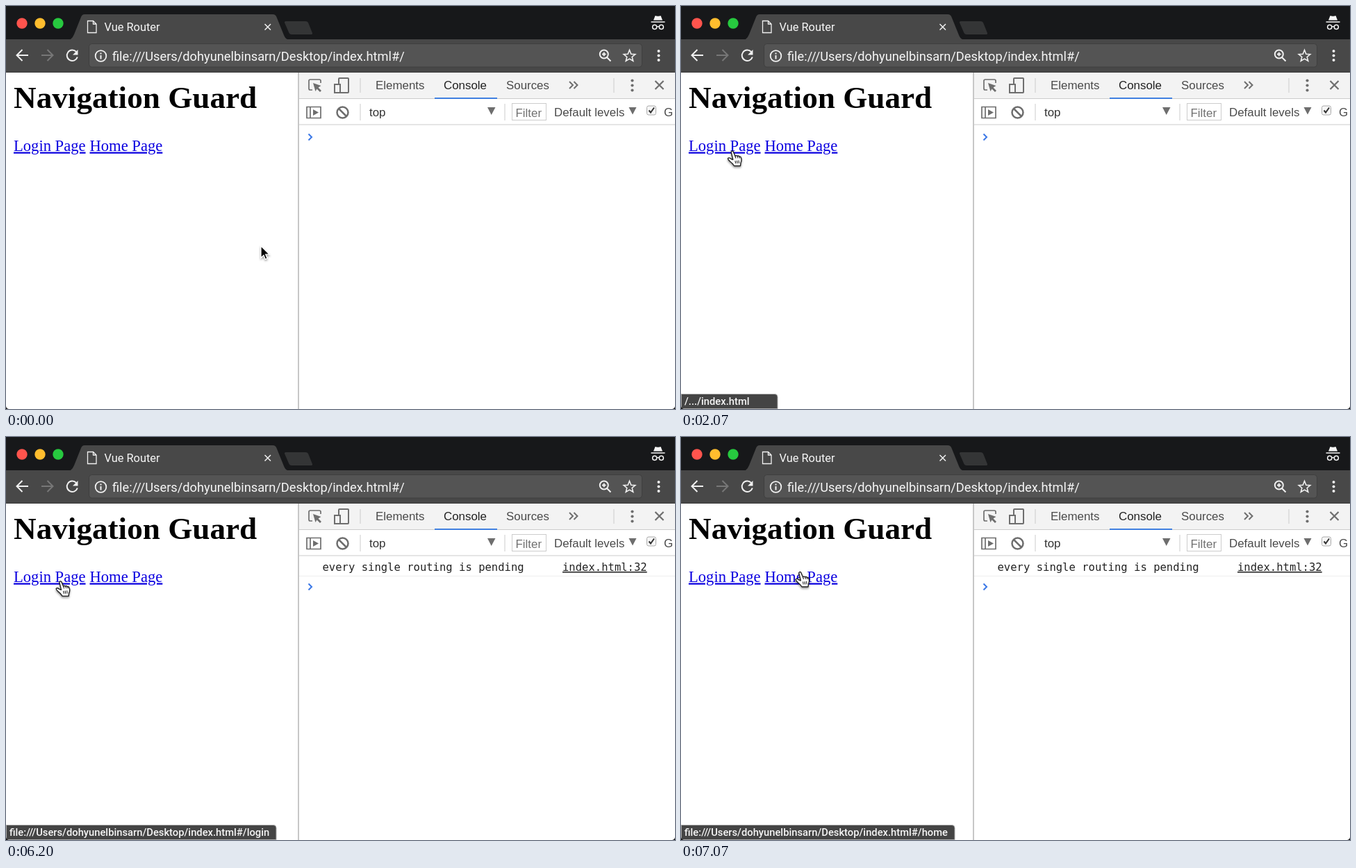
Recreate the animation shown at these times as an HTML page. Size 963 by 581 pixels, loop 8000 ms.

```html
<!DOCTYPE html>
<html lang="en">
<head>
<meta charset="utf-8">
<title>Navigation Guard</title>
<style>
  html, body { margin: 0; width: 100%; height: 100%; overflow: hidden; background: #fff; }
  svg { display: block; width: 100%; height: 100%; }
  text { white-space: pre; }
  .ui { font-family: Roboto, sans-serif; fill: #f6f6f6; }
  .page { font-family: "Liberation Serif", serif; font-size: 22.6px; }
  .tools { font: 16.9px "Liberation Sans", sans-serif; fill: #4a4a4a; }
  .log { font: 15.55px "DejaVu Sans Mono", monospace; fill: #222; }
  .line { fill: none; stroke-width: 2; }
  .light { stroke: #f0f0f0; }
  .gray { stroke: #6e6e6e; }
</style>
</head>
<body>
<svg viewBox="0 0 963 581">
  <defs>
    <clipPath id="statusClip"><rect id="statusClipBox" y="558" height="23"/></clipPath>
    <filter id="shadow" x="-50%" y="-50%" width="220%" height="220%">
      <feDropShadow dx="0" dy="2" stdDeviation="1.5" flood-opacity=".4"/>
    </filter>
  </defs>
  <rect width="963" height="581" fill="#fff"/>

  <!-- window frame and tab -->
  <rect width="963" height="48" fill="#17181a"/>
  <rect y="48" width="963" height="48" fill="#484848"/>
  <path d="M0 95.5H963" stroke="#3a3a3a"/>
  <path d="M93 48Q96 46 98 41L108 16Q109.500 12 113 12H384Q388 12 389.500 16L400 42Q402 47 405 48Z" fill="#484848"/>
  <path d="M403 22H431Q434 22 435 24L441 39Q441.500 41 439 41H411Q408.500 41 407.500 39L401 24Q400.500 22 403 22Z" fill="#343536"/>
  <circle cx="23" cy="25" r="7.700" fill="#ff544d"/>
  <circle cx="49" cy="25" r="7.700" fill="#ffbd2e"/>
  <circle cx="75" cy="25" r="7.700" fill="#27c93f"/>
  <g class="line light">
    <path d="M117.500 21.500H125.500L130 26V38.500H117.500ZM125.500 21.500V26H130" stroke-width="1.300"/>
    <path d="M372.500 26L381 34.500M381 26L372.500 34.500" stroke-width="1.500"/>
  </g>
  <text class="ui" x="141.500" y="35.500" font-size="16.4">Vue Router</text>
  <path d="M932 20.500L934.500 14Q938.500 15.500 942.500 14L945 20.500Z" fill="#f4f4f4"/>
  <g class="line" stroke="#f4f4f4" style="stroke-width:1.5">
    <path d="M928.500 23H948.500"/>
    <circle cx="933.700" cy="30.300" r="3.100"/><circle cx="943.300" cy="30.300" r="3.100"/>
    <path d="M937 30Q938.500 28.800 940 30"/>
  </g>

  <!-- address bar -->
  <rect x="119.500" y="54.500" width="796" height="33.500" rx="4" fill="#545454" stroke="#3e3e3e"/>
  <g class="line light">
    <path d="M32 71H16M23.500 63L15.500 71L23.500 79"/>
    <path d="M51 71H67M59.500 63L67.500 71L59.500 79" stroke="#777"/>
    <path d="M101 66A7.700 7.700 0 1 0 102.800 73.500"/>
    <path d="M103.500 63V70.500H96Z" fill="#f0f0f0" stroke="none"/>
    <circle cx="136.500" cy="72" r="7.800" stroke-width="1.800"/>
    <path d="M136.500 71V76.500M136.500 67.500V69.500"/>
    <circle cx="860.800" cy="69.500" r="6"/>
    <path d="M865 74L870.500 79.500M858 69.500H863.600M860.800 66.700V72.300"/>
    <path d="M897.500 63.500L899.800 69.200L905.800 69.600L901.200 73.500L902.700 79.300L897.500 76.100L892.300 79.300L893.800 73.500L889.200 69.600L895.200 69.200Z" stroke-width="1.600"/>
  </g>
  <g fill="#f0f0f0"><circle cx="939.500" cy="65" r="2"/><circle cx="939.500" cy="71.500" r="2"/><circle cx="939.500" cy="78" r="2"/></g>
  <text class="ui" id="address" x="153" y="78.500" font-size="18.25"></text>

  <!-- web page -->
  <g class="page">
    <text x="11" y="146.500" font-size="45.2" font-weight="bold">Navigation Guard</text>
    <g fill="#0b00e0" text-decoration="underline">
      <text x="11" y="208.500">Login Page</text>
      <text x="120.500" y="208.500">Home Page</text>
    </g>
  </g>

  <!-- developer tools -->
  <rect x="422" y="96" width="541" height="37" fill="#f3f3f3"/>
  <path d="M421 96V581" stroke="#8f8f8f"/>
  <path d="M422 133.500H963M422 171H963" stroke="#ccc"/>
  <path d="M510 104V125M875 104V125M510 141V165M718 141V165" stroke="#ccc"/>
  <path d="M617 133H707" stroke="#3f7fe0" stroke-width="2"/>
  <g class="line gray">
    <path d="M441 121H438Q436 121 436 119V108Q436 106 438 106H451Q453 106 453 108V111" stroke-width="1.700"/>
    <path d="M442 111L453.500 115L449.500 117.500L454 122L452 124L447.500 119.500L445.500 123Z" fill="#6e6e6e" stroke="none"/>
    <path d="M479 112V105Q479 104 480 104H492Q493 104 493 105V124Q493 125 492 125H482M473 113H481V125H473Z"/>
    <path d="M811 109L816 114L811 119M817.500 109L822.500 114L817.500 119"/>
    <path d="M934.500 108L946.500 120M946.500 108L934.500 120" style="stroke-width:2.2"/>
    <path d="M433 145.500H453V161.500H433ZM438 145.500V161.500" stroke-width="1.700"/>
    <path d="M442 149L450 153.500L442 158Z" fill="#6e6e6e" stroke="none"/>
    <circle cx="484.500" cy="153.500" r="8" style="stroke-width:2.5"/>
    <path d="M479 148L490 159" style="stroke-width:2.5"/>
  </g>
  <g fill="#6e6e6e">
    <circle cx="901.500" cy="107.500" r="2.100"/><circle cx="901.500" cy="114.500" r="2.100"/><circle cx="901.500" cy="121.500" r="2.100"/>
    <path d="M693 146H704.500L698.700 157ZM896.500 146H907.500L902 156.500Z"/>
  </g>
  <rect x="728.500" y="140.500" width="49" height="24" fill="#fff" stroke="#ccc"/>
  <g class="tools">
    <text x="532" y="120">Elements</text>
    <text x="630" y="120" fill="#222">Console</text>
    <text x="720" y="120">Sources</text>
    <text x="523" y="158.500" fill="#333">top</text>
    <text x="733.500" y="159.500" fill="#707070">Filter</text>
    <text x="789" y="158.500">Default levels</text>
    <text x="947" y="158.500">G</text>
  </g>
  <rect x="922.500" y="144" width="13" height="13" rx="2.500" fill="#f6f6f6" stroke="#aaa"/>
  <path class="line" d="M925.500 150.500L928 153.500L933 146.500" stroke="#333"/>
  <g id="entry" class="log">
    <path d="M422 200.500H963" stroke="#eee"/>
    <text x="455.500" y="193">every single routing is pending</text>
    <text x="801" y="193" text-decoration="underline">index.html:32</text>
  </g>
  <path id="prompt" class="line" d="M435.500 -4.500L440 0L435.500 4.500" stroke="#3b78e7"/>

  <!-- status bubble -->
  <g id="status" clip-path="url(#statusClip)">
    <path id="bubble" fill="#444" stroke="#a8a8a8"/>
    <text class="ui" id="statusText" x="5" y="575" font-size="14.75" font-weight="500"></text>
  </g>
  <path d="M0 577Q.5 580.500 4 581H0ZM963 577Q962.500 580.500 959 581H963Z" fill="#111"/>

  <!-- pointers, hot spot at 0,0 -->
  <g id="arrow" filter="url(#shadow)">
    <path d="M0 0V17L3.900 13.300L6.300 19L9 17.800L6.600 12.200H12Z" fill="#000" stroke="#fff" stroke-width="1.200"/>
  </g>
  <g id="hand" filter="url(#shadow)" stroke="#222" stroke-width="1.400" stroke-linejoin="round">
    <path d="M-1.800 1.500Q-1 -.8 1 .5L4 7.500Q5.500 5.800 7 7.300Q8.500 6.300 9.800 8Q11.800 7.500 12.500 9.800Q13.800 13.500 12 17L11.500 21.500H2.500Q0 17.500 -3 15.500Q-7 12 -6.300 10.500Q-5 8.800 -1.800 11.500L.8 12.500Z" fill="#fff"/>
    <path d="M4 7.500L5 10.500M7 7.300L8 10.300M9.800 8L10.600 10.500M4 14L4.700 18M6.500 13.800L7.100 18M9 13.500L9.500 17.700" fill="none" stroke-width="1.100"/>
  </g>
</svg>
<script>
const LOOP = 8000, STEP = 1000 / 15;
const PAGE_URL = 'file:///Users/dohyunelbinsarn/Desktop/index.html#/';
const $ = id => document.getElementById(id);
const clamp = u => Math.max(0, Math.min(1, u));
const ramp = (t, from, to) => clamp((t - from) / (to - from));
const ease = u => u * u * (3 - 2 * u);

// time, x, y of the pointer's hot spot
const path = [
  [1260, 367, 346], [1330, 366, 343], [1940, 74, 209],
  [6140, 74, 209], [6590, 170, 186],
  [6740, 170, 186], [7000, 171.5, 194.5]
];

function pointerAt(t) {
  const next = path.findIndex(key => key[0] > t);
  if (next === 0) return path[0].slice(1);
  if (next < 0) return path[path.length - 1].slice(1);
  const [t0, x0, y0] = path[next - 1], [t1, x1, y1] = path[next];
  const u = ease(ramp(t, t0, t1));
  return [x0 + (x1 - x0) * u, y0 + (y1 - y0) * u];
}

function statusAt(t) {
  if (t < 3460) return ['/.../index.html', 139, ramp(t, 1860, 2060)];
  if (t < 6380) return [PAGE_URL + 'login', t < 3520 ? 330 : 389, 1];
  const dip = Math.max(0, 1 - Math.abs(t - 6900) / 130);
  return [PAGE_URL + 'home', 394, 1 - .5 * dip];
}

function draw(t) {
  const [x, y] = pointerAt(t);
  const overLink = t > 1800 && t < 6500 || t > 6830;
  for (const id of ['arrow', 'hand']) {
    $(id).setAttribute('transform', `translate(${x} ${y})`);
    $(id).style.display = (id === 'hand') === overLink ? '' : 'none';
  }

  const [label, width, opacity] = statusAt(t);
  $('status').style.opacity = opacity;
  $('statusText').textContent = label;
  $('statusClipBox').setAttribute('width', width + 1);
  $('bubble').setAttribute('d', `M.5 580.5V559.5H${width - 4}Q${width} 559.5 ${width} 563.5V580.5Z`);

  const logged = t >= 4120;
  $('entry').style.display = logged ? '' : 'none';
  $('prompt').setAttribute('transform', `translate(0 ${logged ? 216 : 189})`);
}

$('address').textContent = PAGE_URL;
const start = performance.now();
function tick() {
  const t = (performance.now() - start) % LOOP;
  draw(Math.floor(t / STEP + .06) * STEP);
  requestAnimationFrame(tick);
}
tick();
</script>
</body>
</html>
```
